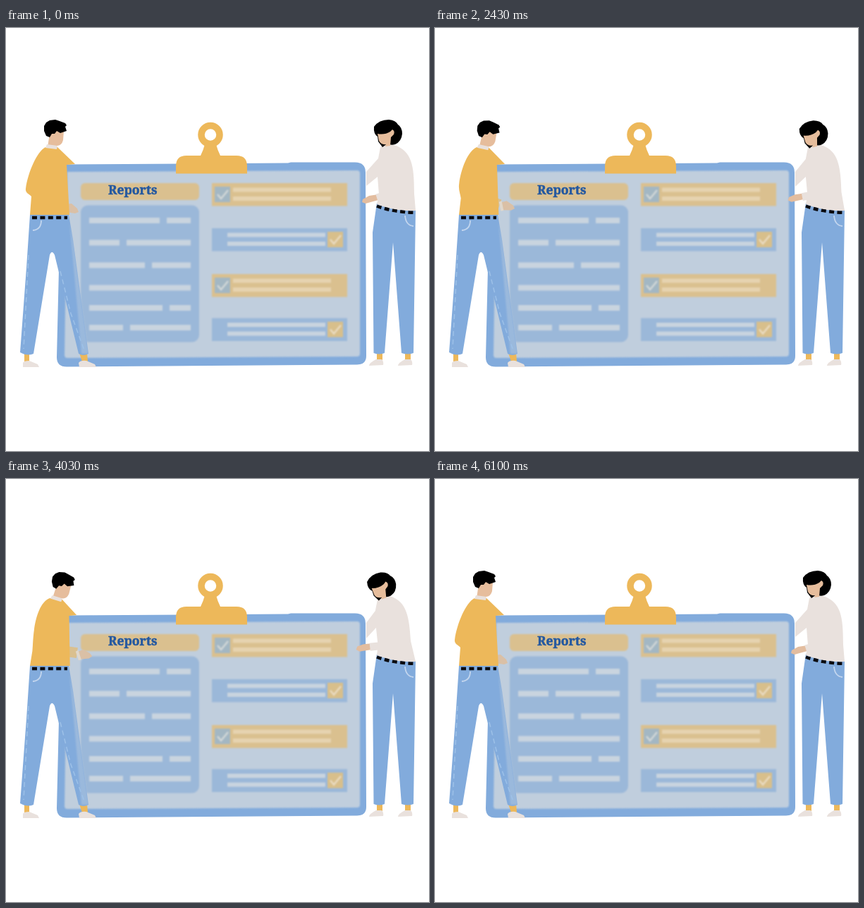
Animation of 600x600 px, one loop 6130 ms. Source, as an HTML page:

```html
<!DOCTYPE html>
<html lang="en">
<head>
<meta charset="utf-8">
<title>Reports board</title>
<style>
  html, body { margin: 0; width: 100%; height: 100%; overflow: hidden; background: #fff; }
  svg { display: block; width: 100vw; height: 100vh; }
  .blue { fill: #82abdc; } .gold { fill: #edb85a; } .pale { fill: #e9e1dd; } .skin { fill: #e6bd9c; }
  .softBlue { fill: #9bb8d9; } .softGold { fill: #dac08f; }
  .line { fill: none; stroke: #c9d4df; }
  .belt { fill: none; stroke: #0b0b0f; stroke-width: 4.5; stroke-dasharray: 7 4.4; }
  .pocket { fill: none; stroke: #c3d6ee; stroke-width: 1.8; }
  .stitch { fill: none; stroke: #9dc1e8; stroke-width: 1.5; stroke-dasharray: 7 5; }
  .soft { filter: blur(0.8px); }
  text { font: bold 17.6px "Noto Serif", serif; fill: #2458a0; stroke: #2458a0; stroke-width: 0.5; }
</style>
</head>
<body>
<svg viewBox="0 0 600 600">
  <!-- board -->
  <path class="blue" d="M85 193.500L400 191.500 404 190.500 495 190.500Q510 190.500 510 205L511 465Q511 477.500 498 477.500L86 480.500Q72 480.500 72 467L76 300Z"/>
  <g class="soft">
    <path fill="#c0cedd" d="M87 204L498 202Q502 202 502 206V462Q502 466 498 466L87 468Q83 468 83 464Z"/>
    <rect class="softGold" x="106" y="220" width="168" height="24" rx="6"/>
    <rect class="softBlue" x="106" y="251.500" width="168" height="194" rx="10"/>
    <path class="line" stroke-width="8" d="M118 273H218M228 273H262M118 304.500H161M171 304.500H262M118 336.500H197M207 336.500H262M118 368.500H262M118 397H222M232 397H262M118 425H166M176 425H262"/>
    <g id="rows"></g>
  </g>

  <!-- clip -->
  <circle cx="290" cy="151.500" r="13" fill="none" stroke="#edb85a" stroke-width="9.5"/>
  <path class="gold" d="M282 165Q280 173 276 181H256Q241 181 241 196V206.500H342V196Q342 181 327 181H304Q300 173 298 165Z"/>

  <!-- man -->
  <path id="manSleeve" fill="none" stroke="#dac08f" stroke-width="15"/>
  <g id="manHand">
    <path fill="#dac0a6" d="M84 250L93 249 101 256 103 261 98 263 85 261Z"/>
    <path fill="#e0d8cd" d="M82 249L86 248 87 262 83 262Z"/>
  </g>
  <path class="gold" d="M26 462H33V474H26ZM104 461H115L116 473H108Z"/>
  <path class="pale" d="M24 481V475Q25 472 33 472L45 477 47 481ZM104 481L103 475Q106 471 114 472L126 477 128 481Z"/>
  <path class="blue" d="M34 265H89L95 300 117 462Q110 466 103 462L69 322Q65 314 62 322L39 462Q30 466 20 460L29 340Z"/>
  <path class="soft" fill="#c0cedd" opacity=".4" d="M90 275L95 300 117 462H107Z"/>
  <path class="stitch" d="M32 322L25 455M77 345L92 405 111 457"/>
  <path class="pocket" d="M50 273Q50 286 38 287"/>
  <path id="manTorso" class="gold"/>
  <path class="belt" d="M37 269H87"/>
  <g id="manHead">
    <path class="skin" d="M62 149L69 144 82 146 81 159Q79 167 72 167L71 171 59 169Z"/>
    <path d="M54 139L57 134 62 131 70 130 76 132 84 135 86 138 84 140 86 146 77 149 72 146 69 150 65 150 62 155 57 153 54 146Z"/>
    <path class="pale" d="M58 165L73 167 72 172 56 170Z"/>
  </g>

  <!-- woman -->
  <path class="gold" d="M526 460H534V471H526ZM566 460H574V471H566Z"/>
  <path class="pale" d="M515 479Q515 475 525 470L533 470Q536 473 535 478ZM556 479Q556 475 566 470L574 470Q577 473 576 478Z"/>
  <path class="blue" d="M526 248L581 258 578 461Q570 464 561 461L549 304 537 461Q529 464 521.500 461L520 290Z"/>
  <path class="pocket" d="M566 266Q567 280 578 281"/>
  <path id="womanHand" fill="#e3bd9f"/>
  <path id="womanSleeve" fill="none" stroke="#e9e1dd" stroke-width="11"/>
  <path id="womanTorso" class="pale"/>
  <path class="belt" d="M526 252.500Q548 261 581 262"/>
  <g id="womanHead">
    <path d="M522 140Q529 130 543 130Q553 131 556 137Q562 141 562 150Q561 161 552 165Q546 167 541 164L534 169 528 161 527 154Q521 150 522 140Z"/>
    <path class="skin" d="M527 150Q537 152 545 147L548 144Q552 146 550 151L546 155 545 167 538 168 539 165Q532 166 529 160Z"/>
  </g>
  <text x="145" y="236">Reports</text>
</svg>
<script>
const $ = id => document.getElementById(id);

// Checklist rows alternate between gold (box left) and blue (box right).
$("rows").innerHTML = [220, 284, 349, 411.5].map((y, i) => {
  const gold = i % 2 === 0, box = gold ? 296 : 456, x = gold ? 322 : 314;
  return `<rect class="${gold ? "softGold" : "softBlue"}" x="292" y="${y}" width="192" height="32.5"/>
    <rect x="${box}" y="${y + 5}" width="22" height="22" fill="${gold ? "#a3b7c3" : "#d8bf8b"}"/>
    <path class="line" stroke-width="2.5" style="stroke:${gold ? "#d3d8d8" : "#eadcc2"}" d="M${box + 4} ${y + 16}l5 6 10-12"/>
    <path class="line" stroke-width="6" ${gold ? 'style="stroke:#e6d3b0"' : ""} d="M${x} ${y + 9.5}h139M${x} ${y + 22}h139"/>`;
}).join("");

// Each path runs from an upright pose to a leaning pose.
const poses = {
  manTorso: ["M56 169C44 175 31 205 28 228C27 234 34 236 36 239L34 265L90 265L86 194L98 193L73 169Z",
             "M65 169C51 173 47 192 45 208C43 222 40 236 38 246L34 265L91 265L91 194L101 193L81 170Z"],
  manSleeve: ["M62 240L82 255", "M70 243L109 243"],
  womanTorso: ["M531 169C538 164 545 164 551 166C576 175 579 195 579 235L581 259C560 260 545 257 526 250L529 236L527 211L511 224L511 204L528 185Z",
               "M525 173C530 167 538 165 545 167C565 175 569 195 572 228L581 259C560 260 545 257 526 250L527 236L524 211L511 227L511 204L522 188Z"],
  womanSleeve: ["M548 234L526 241", "M542 236L512 237"],
  womanHand: ["M528 236L515 238L506 243L505 247L510 249L528 244Z",
              "M514 232L503 233L495 235L493 240L498 243L514 241Z"]
};

function mix(a, b, p) {
  const ends = b.match(/[\d.]+/g);
  let i = 0;
  return a.replace(/[\d.]+/g, n => (+n + (ends[i++] - n) * p).toFixed(2));
}

const LOOP = 6130, SWAY = LOOP / 2;

function draw(now) {
  const p = (1 - Math.cos(2 * Math.PI * (now % LOOP) / SWAY)) / 2;
  for (const id in poses) $(id).setAttribute("d", mix(...poses[id], p));
  $("manHand").setAttribute("transform", `translate(${26 * p} ${-10.5 * p}) rotate(${-20 * p} 94 256)`);
  $("manHead").setAttribute("transform", `translate(${10 * p} ${1.5 * p}) rotate(${14 * p} 65 168)`);
  $("womanHead").setAttribute("transform", `translate(${-8 * p} ${3.5 * p}) rotate(${-14 * p} 540 167)`);
}

const start = performance.now();
(function tick() {
  draw(performance.now() - start);
  requestAnimationFrame(tick);
})();
</script>
</body>
</html>
```
